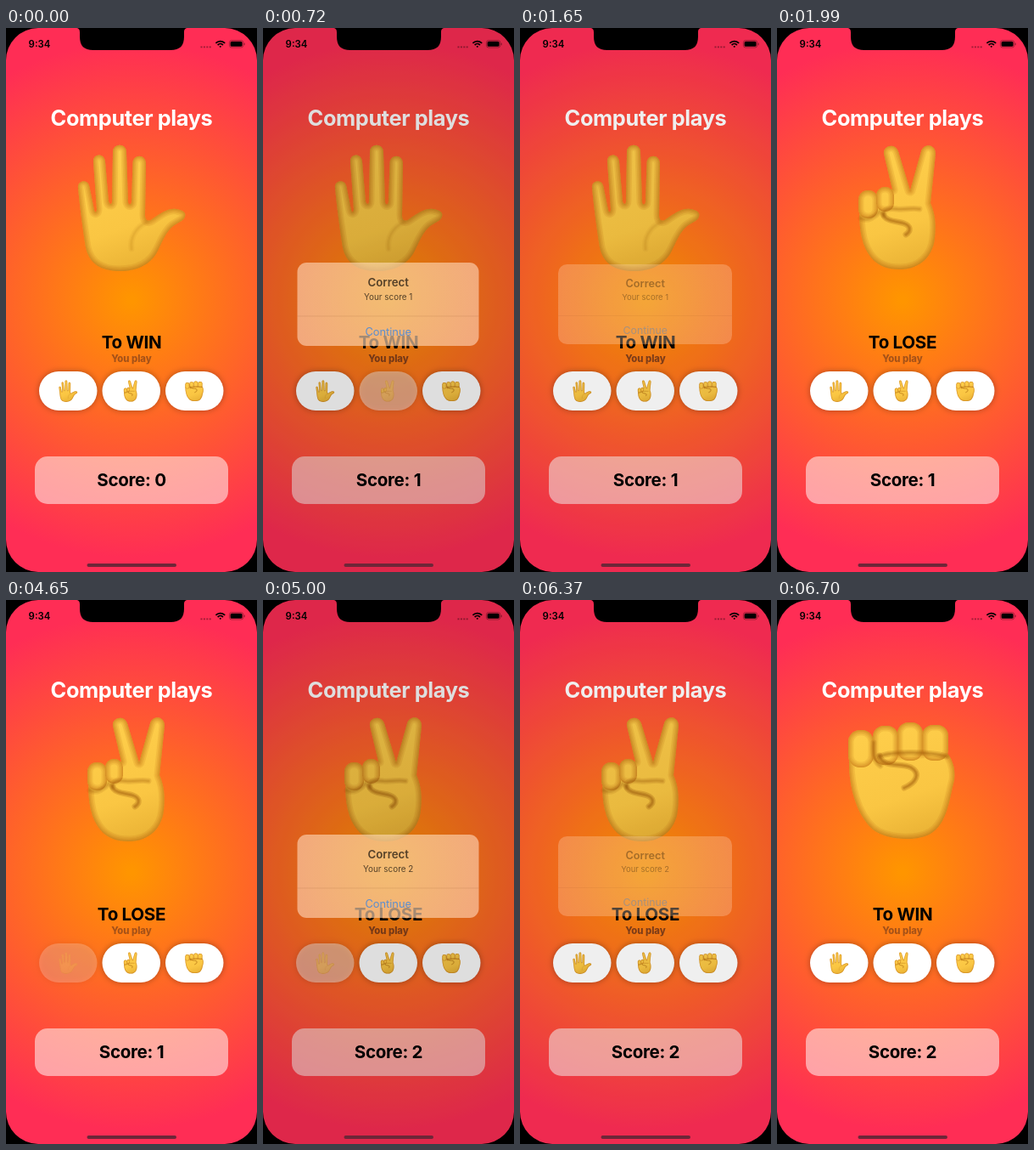
Recreate the animation shown at these times as an HTML page with a canvas. Size 296 px wide and 640 px high, loop 8 s.

```html
<!DOCTYPE html>
<html lang="en">
<head>
<meta charset="utf-8">
<title>Hand game</title>
<style>
html, body { margin: 0; width: 296px; height: 640px; overflow: hidden; background: #000; }
canvas { display: block; width: 296px; height: 640px; }
</style>
</head>
<body>
<canvas id="stage"></canvas>
<script>
const W = 296, H = 640, LOOP = 8000;
const canvas = document.getElementById('stage');
const dpr = window.devicePixelRatio || 1;
canvas.width = W * dpr;
canvas.height = H * dpr;
const ctx = canvas.getContext('2d');

const rounds = [
  { from: 0, hand: 'paper', goal: 'To WIN', pick: 1, press: 500, open: 610, hold: 1390, close: 1530, end: 1990 },
  { from: 1990, hand: 'scissors', goal: 'To LOSE', pick: 0, press: 4650, open: 4790, hold: 6110, close: 6260, end: 6700 },
  { from: 6700, hand: 'rock', goal: 'To WIN', pick: -1, press: LOOP, open: LOOP, hold: LOOP, close: LOOP, end: LOOP }
];
// Alert opacity, scale and opacity of the pressed button at each step.
const opening = [[.25, 1.12, .25], [.65, 1.044, .45], [.9, 1.015, .75], [.98, 1.004, .95], [1, 1, 1]];
const closing = [.85, .32, .08, .01];
const OPEN_STEP = 107.5;

// Outline of each hand, rounded knuckles in front of it, and creases.
const hands = {
  paper: {
    body: 'M85 188C84 179 97 177 98.500 187L104 214C105 218 107 217 107 213L103 158C102 147 116 147 117 157L121 204C122 208 125 208 125 204L126 146C126 135 142 135 142 146L144 205C145 209 148 208 148 204L149.500 159C150 148 165 148 165 160L164 220C164 227 168 228 172 225C182 218 192 211 201 213C208 214 213 217 211 222C210 227 202 229 196 234C188 241 184 252 179 262C171 278 155 286 134 286C112 286 98 277 94 258C91 240 87 210 85 188Z',
    knuckles: [],
    creases: [['M165 229C153 235 146 247 148 260', .25]]
  },
  scissors: {
    body: 'M98 208C96 228 98 251 108 266C117 280 130 284 145 284C168 284 184 269 186 247C188 230 186 217 181 206L187 148C187 136 173 135 170 145L157 191L143 145C139 135 125 138 126 148L136 190Z',
    knuckles: [[96, 191, 23, 33, 11], [117, 187, 21, 29, 10]],
    creases: [
      ['M126 220C125 212 134 212 142 213C152 214 159 211 168 213', .6],
      ['M125 219C128 228 142 227 150 230C158 233 158 239 152 243', 1],
      ['M99 224C107 228 116 222 121 216', .5]
    ]
  },
  rock: {
    body: 'M85 185C84 218 93 252 113 270C128 282 163 285 181 275C201 263 203 235 209 212C211 197 206 186 199 178Z',
    knuckles: [[142, 144, 30, 45, 13], [171, 147, 31, 42, 13], [113, 148, 30, 46, 13], [84, 153, 30, 44, 14]],
    creases: [
      ['M121 184C135 178 180 178 200 184', .8],
      ['M121 183C124 198 146 191 158 197C170 204 164 215 150 221', 1],
      ['M114 168C113 184 116 192 122 195', .6]
    ]
  }
};

for (const hand of Object.values(hands)) {
  hand.body = new Path2D(hand.body);
  hand.knuckles = hand.knuckles.map(box => roundBox(...box));
  hand.creases = hand.creases.map(([d, strength]) => [new Path2D(d), strength]);
}

function roundBox(x, y, w, h, r) {
  const path = new Path2D();
  path.roundRect(x, y, w, h, r);
  return path;
}

function fill(path, color) {
  ctx.fillStyle = color;
  ctx.fill(path);
}

function text(str, x, middle, size, weight, color, spacing = 0) {
  ctx.font = `${weight} ${size}px Inter, "Liberation Sans", sans-serif`;
  ctx.letterSpacing = spacing * size + 'px';
  ctx.textAlign = 'center';
  ctx.fillStyle = color;
  ctx.fillText(str, x, middle + size * .364);
}

function radial(x, y, r0, r1, inner, outer) {
  const g = ctx.createRadialGradient(x, y, r0, x, y, r1);
  g.addColorStop(0, inner);
  g.addColorStop(1, outer);
  return g;
}

// Fill a shape and darken it softly towards its edge.
function puff(path) {
  const skin = ctx.createLinearGradient(110, 138, 160, 286);
  skin.addColorStop(0, '#ffcf4c');
  skin.addColorStop(.65, '#fac643');
  skin.addColorStop(1, '#e9b134');
  ctx.save();
  fill(path, skin);
  ctx.clip(path);
  ctx.strokeStyle = 'rgba(176,96,8,.13)';
  for (const w of [13, 9.5, 6.5, 4, 2]) {
    ctx.lineWidth = w;
    ctx.stroke(path);
  }
  ctx.restore();
}

function drawHand(name, x, y, scale) {
  const hand = hands[name];
  ctx.save();
  ctx.translate(x, y);
  ctx.scale(scale, scale);
  ctx.translate(-148, -211);
  ctx.lineCap = ctx.lineJoin = 'round';
  puff(hand.body);
  hand.knuckles.forEach(puff);
  for (const [path, strength] of hand.creases) {
    for (const w of [7, 4, 1.8]) {
      ctx.strokeStyle = `rgba(150,82,8,${.24 * strength})`;
      ctx.lineWidth = w;
      ctx.stroke(path);
    }
  }
  ctx.restore();
}

function drawButton(name, i, opacity) {
  const x = 39 + i * 74.5;
  ctx.save();
  ctx.globalAlpha = opacity;
  ctx.save();
  ctx.shadowColor = 'rgba(0,0,0,.33)';
  ctx.shadowBlur = 7 * dpr;
  fill(roundBox(x, 404, 68.5, 46, 23), '#fff');
  ctx.restore();
  drawHand(name, x + 34.3, 427, .172);
  ctx.restore();
}

function drawAlert(score, { alpha, scale, pressed }) {
  const box = roundBox(45, 278, 205, 94, 10.5);
  ctx.save();
  ctx.translate(147.7, 325);
  ctx.scale(scale, scale);
  ctx.translate(-147.7, -325);
  ctx.globalAlpha = alpha;
  fill(box, radial(148, 305, 0, 115, '#ffdcae', '#fdcfb1'));
  ctx.clip(box);
  ctx.fillStyle = 'rgba(90,40,10,.22)';
  ctx.fillRect(45, 338, 205, .8);
  ctx.fillStyle = `rgba(110,45,10,${.17 * pressed})`;
  ctx.fillRect(45, 338, 205, 34);
  text('Correct', 147.7, 300.5, 12.7, 600, '#000');
  text('Your score ' + score, 147.7, 317, 9.5, 400, '#000');
  text('Continue', 147.7, 356, 12.3, 400, '#0a7aff');
  ctx.restore();
}

function drawStatus() {
  text('9:34', 39.5, 19, 11.4, 600, '#000');
  ctx.fillStyle = 'rgba(0,0,0,.38)';
  for (let i = 0; i < 4; i++) ctx.fillRect(229.5 + i * 3.4, 21.5, 2, 1.8);

  ctx.strokeStyle = '#000';
  ctx.lineWidth = 1.7;
  ctx.lineCap = 'butt';
  for (const r of [1, 4.3, 7.4]) {
    ctx.beginPath();
    ctx.arc(252.8, 23, r, -Math.PI * .76, -Math.PI * .24);
    ctx.stroke();
  }

  ctx.strokeStyle = 'rgba(0,0,0,.4)';
  ctx.lineWidth = .8;
  ctx.stroke(roundBox(263.4, 14.6, 16.4, 8.4, 2.6));
  fill(roundBox(264.6, 15.8, 14, 6, 1.6), '#000');
  fill(roundBox(280.6, 17.4, 1, 2.8, .5), 'rgba(0,0,0,.45)');
}

const frame = new Path2D();
frame.rect(0, 0, W, H);
frame.roundRect(0, 0, W, H, 38);
const notch = new Path2D('M82 0C86 0 87 2 87 5L87 10C87 21 92 26 103 26L194 26C205 26 210 21 210 10L210 5C210 2 211 0 215 0Z');

function stateAt(t) {
  const index = rounds.findLastIndex(r => t >= r.from);
  const round = rounds[index];
  const state = { ...round, score: index, alpha: 0, scale: 1, pressed: 0, button: 1 };
  if (t >= round.close) {
    const step = Math.floor((t - round.close) / (round.end - round.close) * 4);
    state.alpha = closing[Math.min(3, step)];
    state.pressed = step ? 0 : .5;
  } else if (t >= round.open) {
    const step = Math.min(4, Math.floor((t - round.open) / OPEN_STEP));
    [state.alpha, state.scale, state.button] = opening[step];
    state.pressed = t >= round.hold ? 1 : 0;
  } else if (t >= round.press) {
    state.button = .22;
  }
  if (t >= round.open) state.score++;
  return state;
}

function draw(t) {
  const s = stateAt(t);
  ctx.setTransform(dpr, 0, 0, dpr, 0, 0);
  ctx.fillStyle = radial(148, 320, 4, 303, '#ff9500', '#ff2d55');
  ctx.fillRect(0, 0, W, H);

  text('Computer plays', 148, 105.5, 25.4, 700, '#fff', -.016);
  drawHand(s.hand, 148, 211, 1);
  text(s.goal, 148, 370, 20.6, 700, '#000', -.016);
  text('You play', 148, 389, 11.3, 800, s.alpha ? '#85401a' : '#a55218');
  ['paper', 'scissors', 'rock'].forEach((name, i) => drawButton(name, i, i === s.pick ? s.button : 1));
  fill(roundBox(34, 504, 228, 56, 15), 'rgba(255,255,255,.52)');
  text('Score: ' + s.score, 148, 532, 20.6, 700, '#000', -.016);

  if (s.alpha) {
    ctx.fillStyle = `rgba(0,0,0,${.2 * s.alpha})`;
    ctx.fillRect(0, 0, W, H);
    drawAlert(s.score, s);
  }

  drawStatus();
  fill(roundBox(95.5, 630, 105.5, 4, 2), '#6e2638');
  ctx.fillStyle = '#000';
  ctx.fill(frame, 'evenodd');
  ctx.fill(notch);
}

function tick() {
  draw(performance.now() % LOOP);
  requestAnimationFrame(tick);
}
tick();
</script>
</body>
</html>
```
